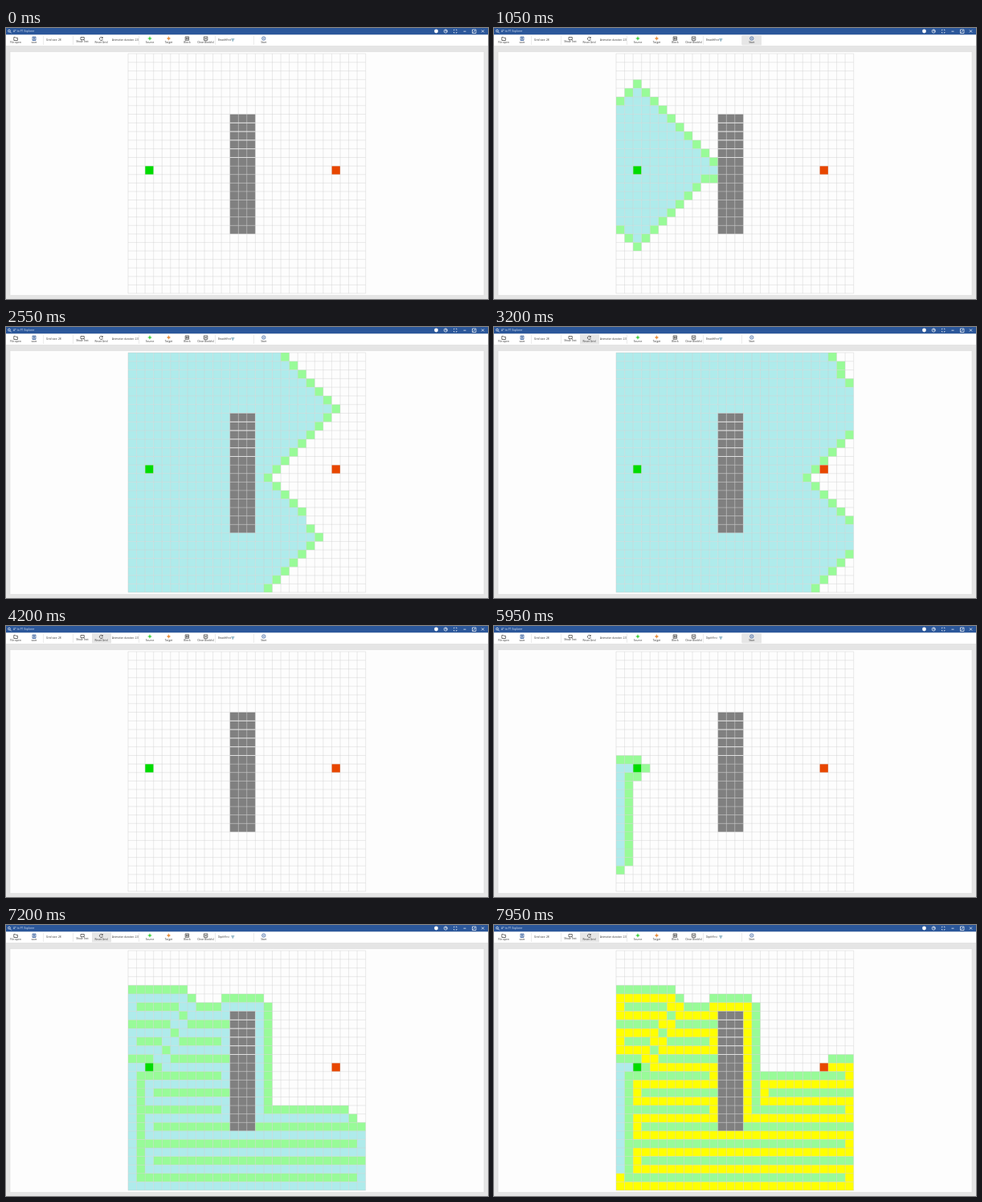
An HTML page that plays this animation: 600 px wide and 338 px high, repeating every 8 s.

```html
<!DOCTYPE html>
<html lang="en">
<head>
<meta charset="utf-8">
<title>Path search</title>
<style>
html, body { margin: 0; width: 100%; height: 100%; overflow: hidden; background: #e5e5e5; }
svg { display: block; width: 100%; height: 100%; }
text { font-family: "Open Sans", "Noto Sans", sans-serif; font-size: 3.3px; fill: #333; }
.mid { text-anchor: middle; }
.icon { fill: none; stroke: #333; stroke-width: .7; }
.white { stroke: #fff; }
</style>
</head>
<body>
<svg viewBox="0 0 600 338" preserveAspectRatio="none">
  <rect width="600" height="338" fill="#e5e5e5"/>
  <rect width="600" height="8.5" fill="#2b579a"/>
  <g class="icon white">
    <circle cx="4" cy="3.6" r="1.4"/><path d="M5 4.6l1.6 1.8"/>
    <circle cx="535.5" cy="4" r="2.4" fill="#fff" stroke="none"/>
    <circle cx="547.3" cy="4" r="2.1"/><path d="M547.3 2v2h2"/>
    <path d="M557.5 3.2v-1h1M560 2.2h1v1M561 5v1h-1M558.500 6h-1v-1"/>
    <path d="M569.500 4.200h3M580.500 2h4.500v4.500h-4.500zM581.500 5.500l2.500-2.500M592 2.500l3 3m0-3l-3 3"/>
  </g>
  <text x="9" y="5.300" style="fill:#dfe8f5">A* to P1 Explorer</text>

  <rect y="8.500" width="600" height="13.500" fill="#fff"/>
  <rect id="startHover" x="309" y="9.500" width="24" height="12" fill="#e6e6e6"/>
  <rect id="resetHover" x="107" y="9.500" width="24" height="12" fill="#e6e6e6"/>
  <path d="M46.500 10v11M83.500 10v11M165.500 10v11M260.500 10v11M308.500 10v11" stroke="#ddd" stroke-width=".6"/>
  <g class="icon">
    <path d="M9.800 11.500h1.700l.6.8h2.300v3.200h-4.600z"/>
    <path d="M33 11h4v4.500h-4zM34 11v1.500h2v-1.500M34 15.500v-1.700h2v1.700" stroke="#2b579a"/>
    <path d="M93 11.500h4.300v3h-2l-1 1v-1h-1.300z"/>
    <path d="M120 12.200a2 2 0 1 0 .4 1.600M120.300 11v1.500h-1.500"/>
    <path d="M223.200 10.900h4.400v4.400h-4.400zM224.500 12.200h1.800v1.800h-1.800z"/>
    <path d="M246.400 10.900h4.400v4.400h-4.400zM247.500 12l2.200 2.200m0-2.200l-2.200 2.200"/>
    <path d="M280.300 13.800h4M281 15h2.600M281.700 16.200h1.200" stroke="#357a9a"/>
    <circle cx="320.800" cy="13" r="2.200" stroke="#2b579a"/>
    <path d="M320.200 12v2l1.500-1z" stroke="#2b579a" stroke-width=".4"/>
    <path d="M179 10.500v5M176.500 13h5" stroke="#44d044"/>
    <path d="M202.500 10.500v5M200 13h5" stroke="#e89040"/>
  </g>
  <circle cx="179" cy="13" r="1.500" fill="#44d044"/>
  <circle cx="202.500" cy="13" r="1.500" fill="#e89040"/>
  <g class="mid">
    <text x="12" y="18.800">File open</text><text x="35" y="18.800">save</text>
    <text x="95" y="18.400">Show Text</text><text x="118.500" y="18.800">Reset Grid</text>
    <text x="179" y="18.800">Source</text><text x="202.500" y="18.800">Target</text>
    <text x="225.500" y="18.800">Block</text><text x="248.500" y="18.800">Clear Block(s)</text>
    <text x="320.800" y="18.800">Start</text>
  </g>
  <text x="50" y="16.400">Grid size: 28</text>
  <text x="132" y="16.400" style="font-size:3px">Animation duration: 2.0</text>
  <text id="method" x="264" y="16.400" style="font-size:2.800px"></text>

  <rect x="5" y="29.500" width="590" height="304" fill="#fdfdfd" stroke="#d8d8d8" stroke-width=".5"/>
  <g id="cells"></g>
  <path id="lines" fill="none" stroke="#cdcdcd" stroke-width=".7" opacity=".6"/>
  <path id="gaps" fill="none" stroke="#eee" stroke-width=".8"/>
</svg>
<script>
const SIZE = 28, LOOP = 8000;
const COLORS = {
  empty: 'none', open: '#98fb98', visited: '#afebeb', path: '#ffff00',
  block: '#808080', source: '#00dc00', target: '#e84600'
};
const $ = id => document.getElementById(id);
const index = (col, row) => row * SIZE + col;
const xAt = col => 152 + col * 10.56;
// Rows above the twelfth are slightly taller.
const yAt = row => row <= 12 ? 32 + row * 10.79 : 331 - (SIZE - row) * 10.59;

const SOURCE = index(2, 13), TARGET = index(24, 13);
const base = Array.from({ length: SIZE * SIZE }, (_, cell) => {
  const col = cell % SIZE, row = Math.floor(cell / SIZE);
  if (cell === SOURCE) return 'source';
  if (cell === TARGET) return 'target';
  return col >= 12 && col <= 14 && row >= 7 && row <= 20 ? 'block' : 'empty';
});

function neighbours(cell) {
  const col = cell % SIZE, row = Math.floor(cell / SIZE);
  return [[col, row - 1], [col + 1, row], [col, row + 1], [col - 1, row]]
    .filter(([c, r]) => c >= 0 && r >= 0 && c < SIZE && r < SIZE)
    .map(([c, r]) => index(c, r))
    .filter(next => base[next] !== 'block');
}

// Records every repaint of the search, then the way back along the parents.
function search(take) {
  const parent = new Map([[SOURCE, null]]), waiting = [SOURCE];
  const steps = [], trace = [];
  while (waiting.length) {
    const cell = take(waiting);
    steps.push([cell, 'visited']);
    if (cell === TARGET) break;
    for (const next of neighbours(cell)) {
      if (parent.has(next)) continue;
      parent.set(next, cell);
      waiting.push(next);
      steps.push([next, 'open']);
    }
  }
  for (let cell = parent.get(TARGET); cell !== SOURCE; cell = parent.get(cell))
    trace.push([cell, 'path']);
  return { steps, trace };
}

const runs = [
  { ...search(list => list.shift()), start: 541.6, pace: 1.92, traceStart: 3370, end: 3850 },
  { ...search(list => list.pop()), start: 5867.6, pace: 1.894, traceStart: 7451, end: LOOP }
];
const TRACE_PACE = 1.91;

const rects = base.map((_, cell) => {
  const col = cell % SIZE, row = Math.floor(cell / SIZE);
  const rect = document.createElementNS('http://www.w3.org/2000/svg', 'rect');
  const box = { x: xAt(col), y: yAt(row), width: xAt(col + 1) - xAt(col), height: yAt(row + 1) - yAt(row) };
  for (const name in box) rect.setAttribute(name, box[name]);
  return $('cells').appendChild(rect);
});

let grid = '', gaps = '';
for (let i = 0; i <= SIZE; i++) {
  grid += `M${xAt(i)} ${yAt(0)}V${yAt(SIZE)}M${xAt(0)} ${yAt(i)}H${xAt(SIZE)}`;
  if (i > 7 && i <= 12) gaps += `M${xAt(12)} ${yAt(i)}H${xAt(15)}`;
}
$('lines').setAttribute('d', grid);
$('gaps').setAttribute('d', gaps);

const shown = [];
function draw(time) {
  const states = base.slice();
  const apply = (steps, elapsed, pace) => {
    const count = Math.max(0, Math.floor(elapsed / pace));
    for (const [cell, state] of steps.slice(0, count))
      if (cell !== SOURCE && cell !== TARGET) states[cell] = state;
  };
  for (const run of runs) {
    if (time < run.start || time >= run.end) continue;
    apply(run.steps, time - run.start, run.pace);
    apply(run.trace, time - run.traceStart, TRACE_PACE);
  }
  states.forEach((state, cell) => {
    if (shown[cell] !== state) rects[cell].setAttribute('fill', COLORS[shown[cell] = state]);
  });

  const between = (from, to) => time >= from && time < to;
  const show = (id, on) => $(id).setAttribute('visibility', on ? 'visible' : 'hidden');
  show('startHover', between(400, 2500) || between(5600, 6700));
  show('resetHover', between(2600, 4300) || between(6800, LOOP));
  $('method').textContent = between(5000, LOOP) ? 'DepthFirst' : 'BreadthFirst';
}

const begin = performance.now();
function tick() {
  draw((performance.now() - begin) % LOOP);
  requestAnimationFrame(tick);
}
tick();
</script>
</body>
</html>
```
